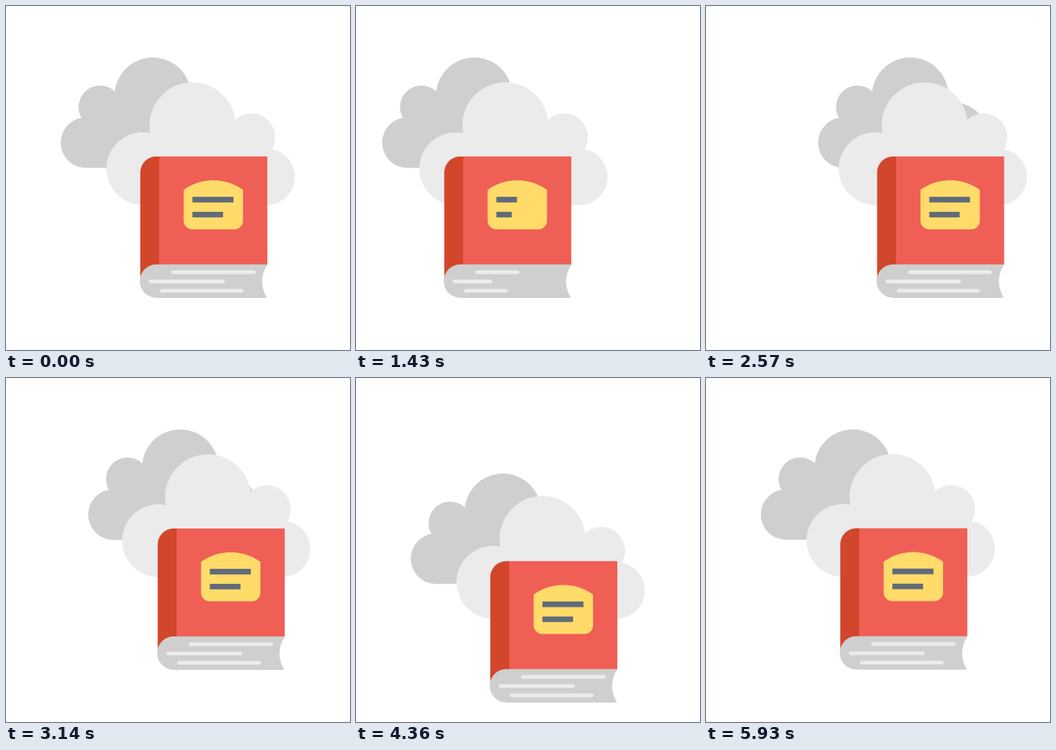
Recreate the animation shown at these times as an HTML page. Size 640 by 640 pixels, loop 6000 ms.

```html
<!DOCTYPE html>
<html lang="en">
<head>
<meta charset="utf-8">
<title>Book and clouds</title>
<style>
  html, body { margin: 0; width: 100%; height: 100%; overflow: hidden; background: #fff; }
  svg { display: block; width: 100%; height: 100%; }

  .back, .front, .book, .line {
    animation: 6s cubic-bezier(.5, 0, .5, 1) infinite;
  }
  .back  { animation-name: back;  fill: #cfcfcf; }
  .front { animation-name: front; fill: #ebebeb; }
  .book  { animation-name: book; }
  .line  { animation-name: shrink; fill: none; stroke-dasharray: 1 2; }
  .label { stroke: #5f6b78; stroke-width: 10.4; }
  .page  { stroke: #ebebeb; stroke-width: 7; stroke-linecap: round; }

  /* Sideways sway first, then one bob down and up */
  @keyframes back {
    0%, 59%, 100%   { transform: translate(0, 0); }
    15.25%, 28.87%  { transform: translate(-53.3px, 0); }
    45.1%           { transform: translate(111.5px, 0); }
    73.07%          { transform: translate(0, 82px); }
    82.23%          { transform: translate(0, -49px); }
  }
  @keyframes front {
    0%, 59%, 100%   { transform: translate(0, 0); }
    17.28%, 26.07%  { transform: translate(-69.3px, 0); }
    45.15%          { transform: translate(62.6px, 0); }
    72.25%          { transform: translate(0, 77.7px); }
    83.9%           { transform: translate(0, -64.2px); }
  }
  @keyframes book {
    0%, 59%, 100%   { transform: translate(0, 0); }
    21.3%, 22.75%   { transform: translate(-86.2px, 0); }
    45.1%           { transform: translate(70.8px, 0); }
    71.4%           { transform: translate(0, 62px); }
    85.6%           { transform: translate(0, -46.3px); }
  }
  @keyframes shrink {
    0%, 45.1%, 100% { stroke-dashoffset: 0; }
    21.3%, 22.75%   { stroke-dashoffset: .5; }
  }
</style>
</head>
<body>
<svg viewBox="0 0 640 640">
  <g class="back">
    <circle cx="273.2" cy="167" r="71.2"/>
    <circle cx="175" cy="188" r="40"/>
    <circle cx="149" cy="254.2" r="47"/>
    <circle cx="356" cy="240.6" r="60.5"/>
    <path d="M149 301.2V254L175 188 273 167 356 240V301.1Z"/>
  </g>

  <g class="front">
    <circle cx="347" cy="222" r="80"/>
    <circle cx="456.5" cy="244" r="44.2"/>
    <circle cx="254.5" cy="302.6" r="67.5"/>
    <circle cx="485.2" cy="318" r="52.1"/>
    <path d="M254.5 370.1V302L347 222 456 244 485.2 318V370.1Z"/>
  </g>

  <g class="book">
    <path fill="#d2462c" d="M286 280H279.3A29.5 29.5 0 0 0 249.8 309.5V513H286Z"/>
    <path fill="#ef5f55" d="M285 280H486.2V482H285Z"/>
    <path fill="#cfcfcf" d="M485.6 543H279.9A31.15 31.15 0 0 1 279.9 480.7H486.2Q467 512 485.6 543Z"/>
    <path fill="#ffdb6a" d="M330.5 342A94.9 94.9 0 0 1 441 342V399.5A16 16 0 0 1 425 415.5H346.5A16 16 0 0 1 330.5 399.5Z"/>
    <path class="line label" pathLength="1" d="M346.8 360.2H423.2"/>
    <path class="line label" pathLength="1" d="M346.8 388.1H403.9"/>
    <path class="line page" pathLength="1" d="M310.9 495.2H461"/>
    <path class="line page" pathLength="1" d="M269 512.5H403.5"/>
    <path class="line page" pathLength="1" d="M289.9 529.7H438.5"/>
  </g>
</svg>
</body>
</html>
```
